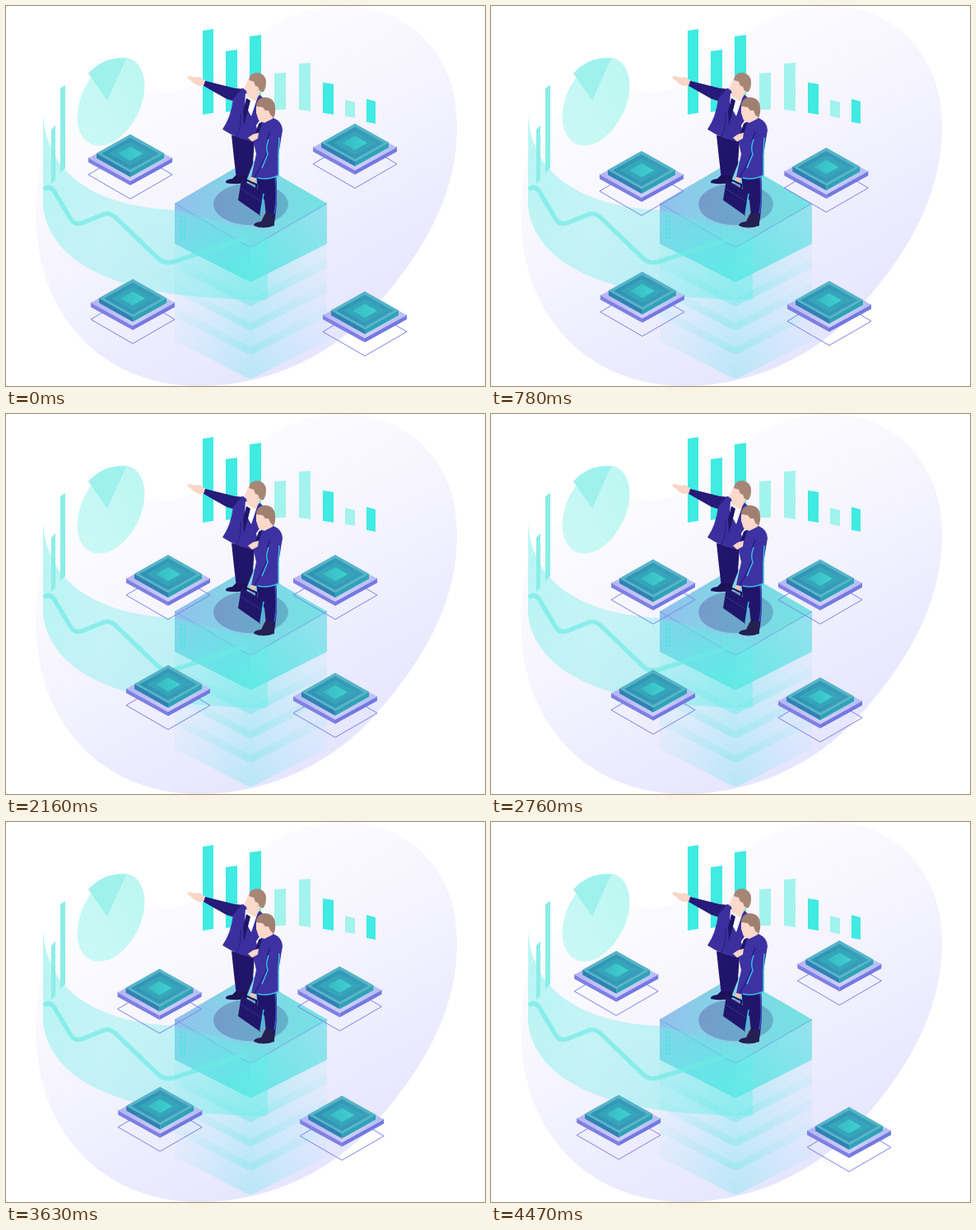
Recreate the animation shown at these times as an HTML page. Size 582 by 462 pixels, loop 4500 ms.

```html
<!DOCTYPE html>
<html lang="en">
<head>
<meta charset="utf-8">
<title>Isometric business scene</title>
<style>
html, body { margin: 0; width: 100%; height: 100%; overflow: hidden; background: #fff; }
svg { display: block; width: 582px; height: 462px; }
</style>
</head>
<body>
<svg viewBox="0 0 582 462">
<defs>
  <linearGradient id="blob" x1=".25" y1=".1" x2=".75" y2=".95">
    <stop stop-color="#fefeff"/><stop offset=".4" stop-color="#f6f5ff"/><stop offset="1" stop-color="#e3e3ff"/>
  </linearGradient>
  <linearGradient id="panel" x1="0" y1="0" x2="1" y2=".35">
    <stop stop-color="#5cebe2" stop-opacity=".42"/><stop offset=".45" stop-color="#7defe9" stop-opacity=".4"/>
    <stop offset="1" stop-color="#5eeee6" stop-opacity=".4"/>
  </linearGradient>
  <linearGradient id="pie" x1=".7" y1="0" x2=".3" y2="1">
    <stop stop-color="#bdf6f2"/><stop offset="1" stop-color="#cbf9f5"/>
  </linearGradient>
  <linearGradient id="cubeTop">
    <stop stop-color="#94bfec"/><stop offset=".3" stop-color="#86d0e8"/><stop offset="1" stop-color="#74e3e3"/>
  </linearGradient>
  <linearGradient id="cubeLeft" x2=".5" y2="1">
    <stop stop-color="#92bdec"/><stop offset="1" stop-color="#66e4e6"/>
  </linearGradient>
  <linearGradient id="cubeRight" x1="0" y1="1" x2="1" y2="0">
    <stop stop-color="#66e6e6"/><stop offset="1" stop-color="#98e2ee"/>
  </linearGradient>
  <linearGradient id="disc">
    <stop stop-color="#769acb"/><stop offset="1" stop-color="#62b2c8"/>
  </linearGradient>
  <radialGradient id="ghost" gradientUnits="userSpaceOnUse" cx="297" cy="325" r="105">
    <stop stop-color="#66e8e8" stop-opacity=".7"/><stop offset="1" stop-color="#a4e6f2" stop-opacity=".25"/>
  </radialGradient>
  <linearGradient id="rim">
    <stop stop-color="#b3b4f3"/><stop offset=".55" stop-color="#cfcefa"/><stop offset="1" stop-color="#b4bdf3"/>
  </linearGradient>
  <linearGradient id="chipTop">
    <stop stop-color="#2f93b6"/><stop offset="1" stop-color="#3a9dba"/>
  </linearGradient>
  <linearGradient id="chipCore">
    <stop stop-color="#37b9c4"/><stop offset="1" stop-color="#3fd2d0"/>
  </linearGradient>

  <g id="chip">
    <path d="M-51 49L0 19 51 49 0 78.500z" fill="none" stroke="#7d80e6"/>
    <path d="M-51 28L0 56V62L-51 34z" fill="#7f80e2"/>
    <path d="M51 28L0 56V62L51 34z" fill="#7379e0"/>
    <path d="M-51 29L0 0 51 29 0 57z" fill="url(#rim)"/>
    <path d="M-41 23L0 46V52L-41 29z" fill="#2f82b2"/>
    <path d="M41 23L0 46V52L41 29z" fill="#2ea3b6"/>
    <path d="M-41 23L0 0 41 23 0 46z" fill="#55b5c6"/>
    <path d="M-35 23.500L0 4 35 23.500 0 43z" fill="url(#chipTop)"/>
    <path d="M-26 23.500L0 9 26 23.500 0 38z" fill="#36a5ba"/>
    <path d="M-15 23.500L0 15 15 23.500 0 32z" fill="url(#chipCore)"/>
  </g>
  <path id="tier" d="M205 247L297 297 390 247V289L303 333Q297 337 291 333L205 289z" fill="url(#ghost)"/>
</defs>

<path fill="url(#blob)" d="M413 0C490 0 548 60 548 145C549 230 505 305 440 375C385 432 310 462 235 462C120 462 36 380 36 250C36 150 80 105 200 104C275 100 295 0 413 0z"/>

<!-- charts -->
<ellipse cx="127.500" cy="116" rx="36" ry="57" transform="rotate(26 127.500 116)" fill="url(#pie)"/>
<path d="M123 115L100 82Q120 60 146 64z" fill="#9ff1ed"/>
<g fill="#3febe2">
  <path d="M239 30L252 28V130L239 132zM267 55L281 53V127L267 129zM296 37L310 35V125L296 127zM385 93L398 95V132L385 130zM438 113L449 116V143L438 141z"/>
  <path fill="#a2f3ee" d="M326 82L340 81V126L326 126zM356 70L370 69V128L356 126zM412 114L424 117V136L412 134z"/>
</g>

<!-- pedestal and its fading tiers -->
<use href="#tier" y="118" opacity=".5"/>
<use href="#tier" y="88.500" opacity=".5"/>
<use href="#tier" y="59" opacity=".55"/>
<use href="#tier" y="29.500" opacity=".7"/>
<path d="M205 240L297 293V335Q294 335 291 333L205 289z" fill="url(#cubeLeft)"/>
<path d="M390 240L297 293V335Q300 335 303 333L390 289z" fill="url(#cubeRight)"/>
<path d="M205 240L297 186 390 240 302 291Q297 294 292 291z" fill="url(#cubeTop)"/>
<path d="M205 240L292 291Q297 294 302 291L390 240" fill="none" stroke="#6ca8e0"/>
<path d="M213 255V283M217 255V283" stroke="#35dfe0" stroke-width="2" stroke-dasharray="3 2"/>
<ellipse cx="297.500" cy="241" rx="45.500" ry="25.500" fill="url(#disc)"/>

<!-- curved screen -->
<path d="M45 130C48 206 112 244 205 248L318 278V357C215 357 60 345 45 245z" fill="url(#panel)"/>
<path d="M55 150L60 145V211L55 216zM66 100L72 96V197L66 203z" fill="#8aeee7"/>
<path d="M46 223Q53 217 59 226L78 258Q83 267 92 264L117 254Q125 250 133 257L184 306Q192 314 203 311L290 283" fill="none" stroke="#6cebe5" stroke-opacity=".65" stroke-width="5.500"/>

<!-- pointing man -->
<path d="M274 157L302 162 300 192 293 210 280 211 277 185z" fill="#21156a"/>
<path d="M279 206L293 206 293 214Q281 218 267 215Q266 211 275 210z" fill="#1b1256"/>
<path d="M242 97L234 97Q228 95 225 91L221 88Q219 85 223 85L230 87 235 86 243 91z" fill="#fbd6c6"/>
<path d="M242 91L278 100 290 101 285 118 268 113 240 97z" fill="#271a79"/>
<path d="M287 100Q305 104 314 113L318 135 306 165Q284 164 263 150Q273 136 276 113z" fill="#3b2f9e"/>
<path d="M291 106L305 113 298 134 290 120z" fill="#fff"/>
<path d="M292 112L297 115 293 131 289 145 288 128z" fill="#21156a"/>
<path d="M295 88L289 101 292 103 293 110 303 116 310 104 306 88z" fill="#fbd9ca"/>
<path d="M295 90Q296 81 306 81Q316 83 316 93Q316 101 312 105L308 103 306 98 303 97 301 92z" fill="#a78676"/>
<path d="M285 130Q286 147 281 157" fill="none" stroke="#281b7c"/>

<!-- man with a briefcase -->
<path d="M304 202L328 204Q331 235 326 264L317 264 314 236 306 226z" fill="#21156a"/>
<path d="M315 252L326 252 326 267Q312 272 301 267Q301 263 310 262z" fill="#252052"/>
<path d="M327 207Q330 235 326 252" fill="none" stroke="#3a54c8" stroke-width="1.500"/>
<path d="M303 145L310 139 325 136Q336 141 336 151L331 181 331 206Q318 213 298 208L304 180 301 166z" fill="#3d32a2"/>
<path d="M304 145L309 138 313 140 305 150z" fill="#fff"/>
<path d="M307 143L312 140 305 161 301 160z" fill="#21156a"/>
<path d="M321 153Q315 166 317 179L309 196 301 210" fill="none" stroke="#281c80" stroke-width="1.500"/>
<path d="M332 160L331 181 331 206Q318 212 306 209M319 162Q315 173 318 180L311 197" fill="none" stroke="#36bde8" stroke-width="1.500"/>
<path d="M294 160L300 156 307 154 306 161 299 165z" fill="#fbd6c6"/>
<path d="M304 122L304 130 307 139 314 142 324 137 326 126 316 119z" fill="#fbd9ca"/>
<path d="M304 122Q304 112 314 111Q326 111 327 123Q328 130 325 136L321 132 319 127 315 127 312 123z" fill="#a18071"/>
<path d="M297 208L303 209 302 217 297 215z" fill="#f2c4b3"/>
<path d="M291 216V211L304 217V223" fill="none" stroke="#1b1256" stroke-width="2"/>
<path d="M286 211L313 227 309 255 282 236z" fill="#21176a"/>
<path d="M313 228L309 254" stroke="#36c6e8" stroke-width="1.500"/>
<path d="M285 222L311 238" stroke="#372b91"/>

<g id="chips"></g>
</svg>
<script>
const LOOP = 4500, LIFT = 15;
// Apex of each chip: outer [x, y], then inner [x, y].
const routes = [
  [151, 156, 197, 185],
  [424, 143, 400, 185],
  [154, 332, 197, 319],
  [436, 347, 400, 328.5],
];
const chips = routes.map(() => {
  const chip = document.createElementNS("http://www.w3.org/2000/svg", "use");
  chip.setAttribute("href", "#chip");
  return document.getElementById("chips").appendChild(chip);
});

function draw() {
  const t = performance.now() % LOOP / LOOP;
  const phase = 4 * Math.min(t, 1 - t); // 0..1 glide inward, 1..2 rise, then back
  const glide = Math.min(phase, 1);
  const rise = Math.max(phase - 1, 0) * LIFT;
  routes.forEach(([x0, y0, x1, y1], i) => {
    const x = x0 + (x1 - x0) * glide;
    const y = y0 + (y1 - y0) * glide - rise;
    chips[i].setAttribute("transform", `translate(${x} ${y})`);
  });
  requestAnimationFrame(draw);
}
draw();
</script>
</body>
</html>
```
